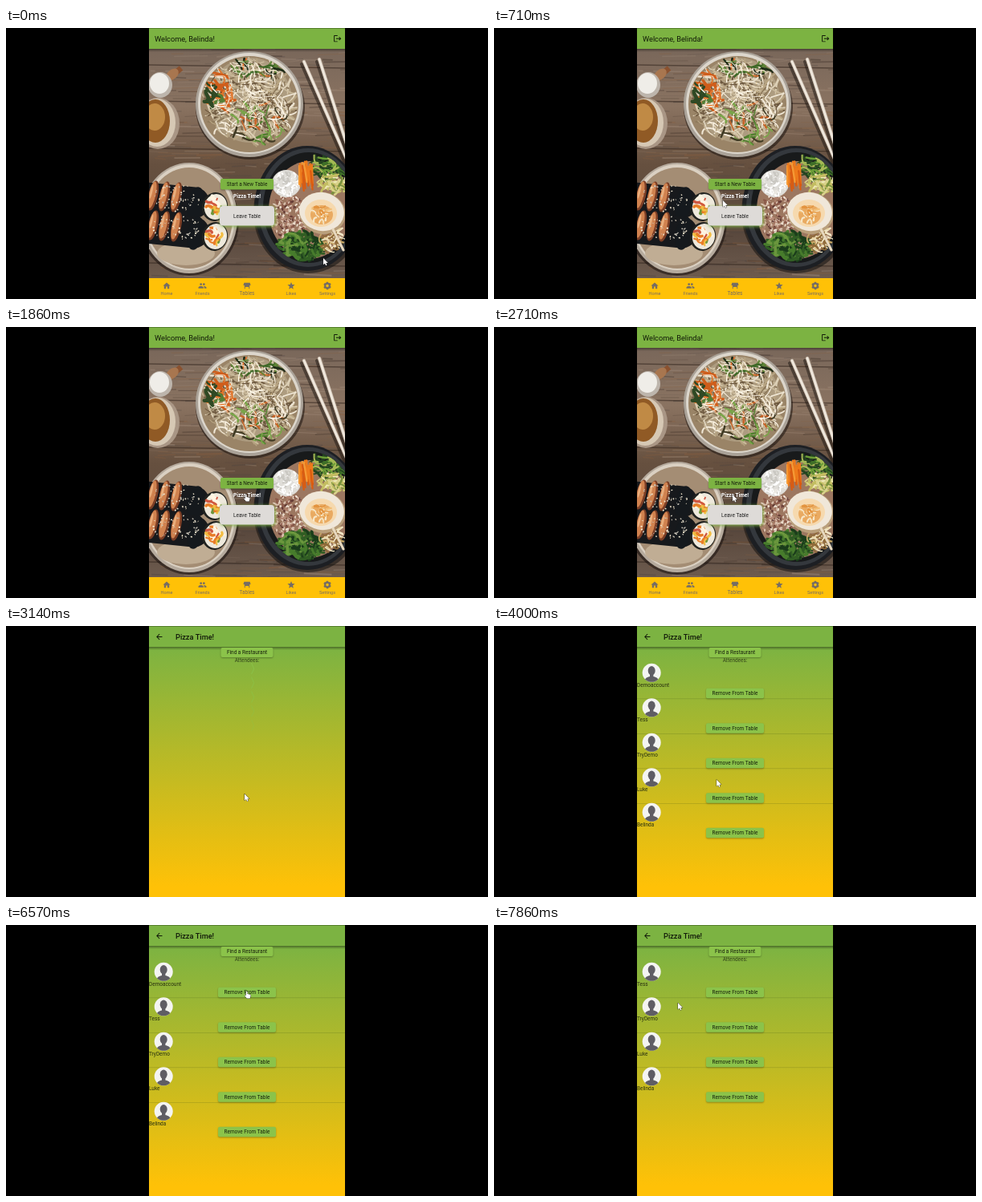
Recreate the animation shown at these times as an HTML page with a canvas. Size 600 by 338 pixels, loop 8 s.

```html
<!DOCTYPE html>
<html lang="en">
<head>
<meta charset="utf-8">
<title>Dinner tables</title>
<style>
html, body { margin: 0; width: 100%; height: 100%; overflow: hidden; background: #000; }
canvas { display: block; width: 100vw; height: 100vh; }
</style>
</head>
<body>
<canvas id="stage" width="600" height="338"></canvas>
<script>
const W = 600, H = 338, LEFT = 178, RIGHT = 422, MID = 300, BAR = 26;
const LOOP = 8000, FPS = 7;
const GREEN = '#7cb342', LIGHT = '#8bc34a', AMBER = '#ffc107';
const PEOPLE = ['Demoaccount', 'Tess', 'TryDemo', 'Luke', 'Belinda'];
const OPEN = 2750, LOADED = 3700, REMOVED = 7000;

const ICONS = {
  home: 'M10 20v-6h4v6h5v-8h3L12 3 2 12h3v8z',
  people: 'M5 8a3 3 0 1 0 6 0a3 3 0 1 0-6 0M13 8a3 3 0 1 0 6 0a3 3 0 1 0-6 0M1 19v-2c0-5 14-5 14 0v2zM17 19v-3l-2-3c3 0 8 1 8 4v2z',
  table: 'M4 4h16l2 7h-3v9h-2v-5H7v5H5v-9H2z',
  star: 'M12 17.3L18.2 21l-1.7-7L22 9.2l-7.2-.6L12 2 9.2 8.6 2 9.2 7.5 14l-1.7 7z',
  back: 'M20 11H7.8l5.6-5.6L12 4l-8 8 8 8 1.4-1.4L7.8 13H20z',
  exit: 'M17 7l-1.4 1.4 2.6 2.6H8v2h10.2l-2.6 2.6L17 17l5-5zM4 5h8V3H4c-1 0-2 1-2 2v14c0 1 1 2 2 2h8v-2H4z',
  arrow: 'M0 0V8.2L1.9 6.5 3.2 9.2 4.5 8.6 3.3 6H5.8z',
  hand: 'M1 0Q2-.6 2.5.4V3L6 3.8Q6.8 4.2 6.5 5.5L5.6 8.5H1.8L-1 5Q-.6 4 .7 5z'
};

const stage = document.getElementById('stage').getContext('2d');

// Seeded generator keeps the food texture the same on every load.
let seed = 11;
function random() {
  seed = (seed * 16807) % 2147483647;
  return seed / 2147483647;
}
const spread = amount => (random() - 0.5) * 2 * amount;
const pick = list => list[Math.floor(random() * list.length)];
const clamp = v => Math.max(0, Math.min(1, v));
const smooth = v => v * v * (3 - 2 * v);

function rect(g, x, y, w, h, fill) {
  g.fillStyle = fill;
  g.fillRect(x, y, w, h);
}

function ellipse(g, x, y, rx, ry, fill, turn = 0) {
  g.beginPath();
  g.ellipse(x, y, rx, ry, turn, 0, Math.PI * 2);
  g.fillStyle = fill;
  g.fill();
}

function line(g, points, color, width) {
  g.beginPath();
  points.forEach(([x, y]) => g.lineTo(x, y));
  g.strokeStyle = color;
  g.lineWidth = width;
  g.stroke();
}

function text(g, str, x, y, size, color, align = 'center', weight = 400) {
  g.font = `${weight} ${size}px Roboto, sans-serif`;
  g.textAlign = align;
  g.fillStyle = color;
  g.fillText(str, x, y);
}

function icon(g, name, cx, cy, size, color) {
  g.save();
  g.translate(cx - size / 2, cy - size / 2);
  g.scale(size / 24, size / 24);
  g.fillStyle = color;
  g.fill(new Path2D(ICONS[name]));
  g.restore();
}

function button(g, label, y, w, h, fill) {
  g.save();
  g.shadowColor = 'rgba(0,0,0,.3)';
  g.shadowBlur = 2;
  g.shadowOffsetY = 1;
  g.fillStyle = fill;
  g.beginPath();
  g.roundRect(MID - w / 2, y, w, h, 2);
  g.fill();
  g.restore();
  text(g, label, MID, y + h / 2 + 2.3, 6.44, '#17210c');
}

// Short curved strokes scattered over an ellipse.
function strands(g, x, y, rx, ry, count, length, width, colors) {
  g.lineCap = 'round';
  for (let i = 0; i < count; i++) {
    const a = random() * 7, r = Math.sqrt(random()), turn = random() * 7;
    const px = x + Math.cos(a) * rx * r, py = y + Math.sin(a) * ry * r;
    const dx = Math.cos(turn) * length, dy = Math.sin(turn) * length;
    g.beginPath();
    g.moveTo(px - dx / 2, py - dy / 2);
    g.quadraticCurveTo(px + spread(length / 2), py + spread(length / 2), px + dx / 2, py + dy / 2);
    g.strokeStyle = pick(colors);
    g.lineWidth = width * (0.6 + random() * 0.7);
    g.stroke();
  }
}

function insideEllipse(g, x, y, rx, ry, paint) {
  g.save();
  g.beginPath();
  g.ellipse(x, y, rx, ry, 0, 0, 7);
  g.clip();
  paint();
  g.restore();
}

function drawWood(g) {
  const shade = g.createLinearGradient(0, BAR, 0, 312);
  [[0, '#79675a'], [0.25, '#8a7361'], [0.5, '#66503f'], [0.8, '#59483d'], [1, '#6d5b4e']]
    .forEach(([at, color]) => shade.addColorStop(at, color));
  rect(g, LEFT, BAR, RIGHT - LEFT, 286, shade);
  for (let i = 0; i < 420; i++) {
    const x = LEFT + random() * 244, y = BAR + random() * 286, len = 8 + random() * 50;
    g.globalAlpha = 0.12 + random() * 0.3;
    line(g, [[x, y], [x + len, y + spread(2)]], pick(['#342720', '#a99482', '#8b5f3c', '#4b4340']), 0.5 + random() * 1.6);
  }
  g.globalAlpha = 0.55;
  for (const y of [46, 91, 150, 293]) line(g, [[LEFT, y], [RIGHT, y + 4]], '#30241d', 1.5);
  g.globalAlpha = 1;
}

function drawDrinks(g) {
  line(g, [[199, 66], [218, 50]], '#8a5230', 7);
  ellipse(g, 207, 58, 9, 6, '#a8764f', -0.7);
  ellipse(g, 192, 71, 15, 16, '#bdb5ac');
  ellipse(g, 191, 69, 12, 13, '#efede8');
  ellipse(g, 189, 119, 27, 32, '#a99685');
  ellipse(g, 188, 118, 23, 30, '#d6c8b4');
  ellipse(g, 186, 116, 18, 27, '#905a25');
  ellipse(g, 185, 111, 13, 17, '#c08a45');
}

function drawNoodles(g) {
  ellipse(g, 304, 99, 68, 65, 'rgba(25,18,14,.55)');
  ellipse(g, 303, 95, 67, 66, '#aaa298');
  ellipse(g, 303, 94, 64, 63, '#dcd6cc');
  ellipse(g, 303, 95, 61, 60, '#9a8467');
  insideEllipse(g, 303, 94, 60, 59, () => {
    ellipse(g, 304, 90, 52, 53, '#ad9c80');
    strands(g, 303, 90, 53, 52, 330, 20, 1.8, ['#ddd0b6', '#c9b99a', '#f0e7d6', '#8e7a5c', '#6c573e', '#b7a482']);
    strands(g, 268, 78, 13, 25, 20, 18, 2.6, ['#e2762b', '#cf5d1b']);
    strands(g, 312, 50, 30, 11, 22, 14, 2.3, ['#d96a25', '#3e6827', '#5f8537', '#1f2b18']);
    strands(g, 258, 84, 9, 16, 12, 10, 4, ['#2f4924', '#557f37']);
    strands(g, 315, 118, 35, 25, 34, 13, 2.1, ['#507f2e', '#78a548', '#c96529', '#403b24']);
    strands(g, 303, 88, 48, 45, 80, 13, 1.1, ['#fff8e9', '#eee2c9']);
    strands(g, 300, 80, 38, 38, 80, 0.8, 1.2, ['#f5dfad', '#5b4525']);
  });
}

function drawRolls(g, y) {
  g.lineCap = 'round';
  line(g, [[174, y], [234, y + 6]], '#17191c', 39);
  [183, 197, 212].forEach((x, i) => {
    ellipse(g, x, y - 3 + i, 6, 19, '#7c3e25', 0.22);
    ellipse(g, x - 1, y - 4 + i, 4.3, 17, '#d0824f', 0.22);
    ellipse(g, x - 2, y - 8 + i, 1.4, 9, '#e9ae7c', 0.22);
  });
  ellipse(g, 236, y + 7, 10, 21, '#15191d', 0.2);
  strands(g, 212, y, 32, 17, 60, 0.8, 1.3, ['#f3e7cf', '#c9c4b8']);
  ellipse(g, 260, y + 11, 16, 18, '#20221f', 0.25);
  ellipse(g, 261, y + 11, 14, 16, '#eee9dc', 0.25);
  strands(g, 260, y + 10, 9, 10, 20, 7, 3.4, ['#e87c27', '#f2bd42', '#6d963a', '#cf5842', '#fff5e2']);
}

function drawSushi(g) {
  ellipse(g, 228, 241, 62, 68, 'rgba(20,14,11,.55)');
  ellipse(g, 228, 237, 60, 69, '#b5aa9d');
  ellipse(g, 228, 236, 57, 66, '#dad0c2');
  ellipse(g, 228, 237, 54, 63, '#a48d74');
  ellipse(g, 224, 281, 36, 15, '#c0ad94');
  drawRolls(g, 212);
  drawRolls(g, 249);
}

function drawRiceBowl(g) {
  ellipse(g, 376, 230, 68, 76, 'rgba(10,10,10,.5)');
  ellipse(g, 375, 225, 66, 78, '#1d1f23');
  ellipse(g, 376, 224, 62, 74, '#34383d');
  ellipse(g, 377, 224, 57, 69, '#181a1b');
  insideEllipse(g, 377, 224, 57, 69, () => {
    ellipse(g, 378, 227, 51, 61, '#9c7760');
    strands(g, 352, 235, 23, 27, 260, 2, 2, ['#d9c0ae', '#8b5949', '#643b35', '#eee0d1', '#b28370']);
    ellipse(g, 349, 194, 18, 17, '#dfddd8');
    strands(g, 349, 194, 15, 14, 60, 5, 2, ['#fff', '#ece9e3', '#cac8c2']);
    strands(g, 402, 174, 23, 15, 70, 13, 2.4, ['#3f7028', '#6a9c37', '#a6b955', '#244420']);
    strands(g, 407, 193, 19, 11, 50, 13, 2.2, ['#d9d38b', '#c3bd61', '#efe8b8', '#78913c']);
    g.lineCap = 'round';
    for (let i = 0; i < 20; i++) {
      const x = 365 + random() * 17, y = 166 + random() * 14;
      line(g, [[x, y], [x + spread(3) + 2, y + 23]], pick(['#ee7b1b', '#d95b11', '#f59a35']), 2.3);
    }
    strands(g, 368, 272, 28, 15, 140, 12, 3, ['#315d24', '#477c2c', '#1b3d1b', '#6a963d']);
    strands(g, 406, 264, 15, 14, 45, 12, 2, ['#e7d2a0', '#c8a765', '#8f6a39', '#f1e6c6']);
  });
  ellipse(g, 394, 231, 29, 26, '#b99f7b', 0.2);
  ellipse(g, 393, 229, 28, 24, '#f0e7d9', 0.2);
  ellipse(g, 392, 231, 20, 17, '#f6d9ae');
  ellipse(g, 393, 233, 14, 12, '#e9aa61');
  strands(g, 393, 232, 13, 10, 24, 6, 2, ['#f7e7c8', '#f2c078', '#e3943f']);
  line(g, [[407, 251], [420, 277]], '#e7d8bf', 3);
}

function drawChopsticks(g) {
  g.lineCap = 'round';
  [[[371, 42], [426, 168]], [[390, 39], [428, 157]]].forEach(stick => {
    line(g, stick.map(([x, y]) => [x - 3, y + 3]), 'rgba(25,18,14,.5)', 4);
    line(g, stick, '#c9bcad', 4.2);
    line(g, stick, '#f0e8dd', 2.6);
  });
}

function drawNav(g) {
  rect(g, LEFT, 312, 244, 26, AMBER);
  const color = '#766d63';
  [['home', 'Home', 200], ['people', 'Friends', 244.5], ['table', 'Tables', MID], ['star', 'Likes', 355], ['', 'Settings', 400]]
    .forEach(([name, label, x]) => {
      if (name) icon(g, name, x, 321.5, 11, color);
      text(g, label, x, 333.2, label === 'Tables' ? 6.4 : 5.5, color);
    });
  g.save();
  g.strokeStyle = color;
  g.lineCap = 'butt';
  g.beginPath();
  g.arc(400, 321.5, 2.8, 0, 7);
  g.lineWidth = 2.2;
  g.stroke();
  for (let i = 0; i < 6; i++) {
    const c = Math.cos(i * Math.PI / 3 + 0.5), s = Math.sin(i * Math.PI / 3 + 0.5);
    line(g, [[400 + c * 3, 321.5 + s * 3], [400 + c * 4.8, 321.5 + s * 4.8]], color, 2.3);
  }
  g.restore();
}

function drawBar(g) {
  const shadow = g.createLinearGradient(0, BAR, 0, BAR + 4);
  shadow.addColorStop(0, 'rgba(0,0,0,.4)');
  shadow.addColorStop(1, 'rgba(0,0,0,0)');
  rect(g, LEFT, BAR, 244, 4, shadow);
  rect(g, LEFT, 0, 244, BAR, GREEN);
  rect(g, LEFT, 0, 244, 0.7, '#496b29');
}

function drawHome(g) {
  g.save();
  g.beginPath();
  g.rect(LEFT, 0, 244, H);
  g.clip();
  [drawWood, drawDrinks, drawNoodles, drawChopsticks, drawSushi, drawRiceBowl, drawBar].forEach(draw => draw(g));
  text(g, `Welcome, ${PEOPLE[4]}!`, 185, 16.7, 9.2, '#111a08', 'left');
  icon(g, 'exit', 412.7, 13.2, 11, '#111a08');
  button(g, 'Start a New Table', 188, 66, 13.5, GREEN);
  text(g, 'Pizza Time!', MID, 212, 6.44, '#fff', 'center', 700);
  g.fillStyle = '#dedbd8';
  g.shadowColor = GREEN;
  g.shadowBlur = 4;
  g.shadowOffsetX = g.shadowOffsetY = 1;
  g.beginPath();
  g.roundRect(266, 222, 68, 24.5, 4);
  g.fill();
  g.shadowColor = 'transparent';
  text(g, 'Leave Table', MID, 236.6, 6.44, '#222');
  drawNav(g);
  g.restore();
}

function drawPerson(g, name, y) {
  ellipse(g, 196.2, y, 11.5, 11.5, '#f4f4f2');
  insideEllipse(g, 196.2, y, 11.5, 11.5, () => {
    ellipse(g, 196.2, y - 2.6, 4.5, 5.7, '#5f5d64');
    rect(g, 194, y + 1, 4.4, 5, '#5f5d64');
    ellipse(g, 196.2, y + 10.5, 9, 6, '#5f5d64');
  });
  text(g, name, LEFT, y + 17.3, 6.44, '#29310f', 'left');
  button(g, 'Remove From Table', y + 19.5, 72, 12.4, LIGHT);
}

function drawLoading(g) {
  for (let i = 0; i < 5; i++) {
    const y = 46 + i * 17.7;
    g.globalAlpha = 0.85 - i * 0.13;
    line(g, [[305.5, y], [308.5, y + 7], [308, y + 9], [305.5, y + 14]], LIGHT, 1);
  }
  g.globalAlpha = 1;
}

function drawTable(g, t) {
  const fill = g.createLinearGradient(0, BAR, 0, 325);
  fill.addColorStop(0, GREEN);
  fill.addColorStop(1, AMBER);
  rect(g, LEFT, 0, 244, H, fill);
  drawBar(g);
  icon(g, 'back', 190.8, 13.5, 11, '#101708');
  text(g, 'Pizza Time!', 211, 16.7, 9.2, '#101708', 'left', 500);
  button(g, 'Find a Restaurant', 27, 65, 12, LIGHT);
  text(g, 'Attendees:', MID, 45.4, 6.44, '#33451a');
  if (t < LOADED) return drawLoading(g);
  PEOPLE.slice(t < REMOVED ? 0 : 1).forEach((name, i) => {
    const y = 58.3 + i * 43.5;
    if (i) rect(g, LEFT, y - 11.3, 244, 0.6, 'rgba(60,80,20,.3)');
    drawPerson(g, name, y);
  });
}

// time, x, y
const PATH = [[0, 395, 287], [150, 390, 278], [710, 285, 215], [1290, 297, 209], [3700, 297, 209.5],
  [4700, 205, 127], [5300, 205, 127], [6000, 298, 83], [7050, 298, 83], [7700, 229, 97], [LOOP, 229, 97]];

function drawPointer(g, t) {
  const next = PATH.findIndex(p => p[0] > t);
  const [t0, x0, y0] = PATH[next - 1], [t1, x1, y1] = PATH[next];
  const k = smooth((t - t0) / (t1 - t0));
  const overTitle = t > 1000 && t < 2600, overButton = t > 5900 && t < 7150;
  g.save();
  g.translate(x0 + (x1 - x0) * k, y0 + (y1 - y0) * k);
  const shape = new Path2D(ICONS[overTitle || overButton ? 'hand' : 'arrow']);
  g.fillStyle = '#fff';
  g.strokeStyle = '#222';
  g.lineWidth = 0.8;
  g.stroke(shape);
  g.fill(shape);
  g.restore();
}

const homeCanvas = document.createElement('canvas');
homeCanvas.width = W;
homeCanvas.height = H;
drawHome(homeCanvas.getContext('2d'));

function render(now) {
  const t = Math.floor((now % LOOP + 5) * FPS / 1000) * 1000 / FPS % LOOP;
  const g = stage;
  rect(g, 0, 0, W, H, '#000');
  if (t < OPEN + 300) g.drawImage(homeCanvas, 0, 0);
  if (t >= OPEN) {
    const k = clamp((t - OPEN) / 300);
    g.save();
    g.globalAlpha = k;
    g.translate(0, (1 - k) ** 2 * H / 4);
    drawTable(g, t);
    g.restore();
  }
  drawPointer(g, t);
}

const start = performance.now();
function tick() {
  render(performance.now() - start);
  requestAnimationFrame(tick);
}
tick();
</script>
</body>
</html>
```
